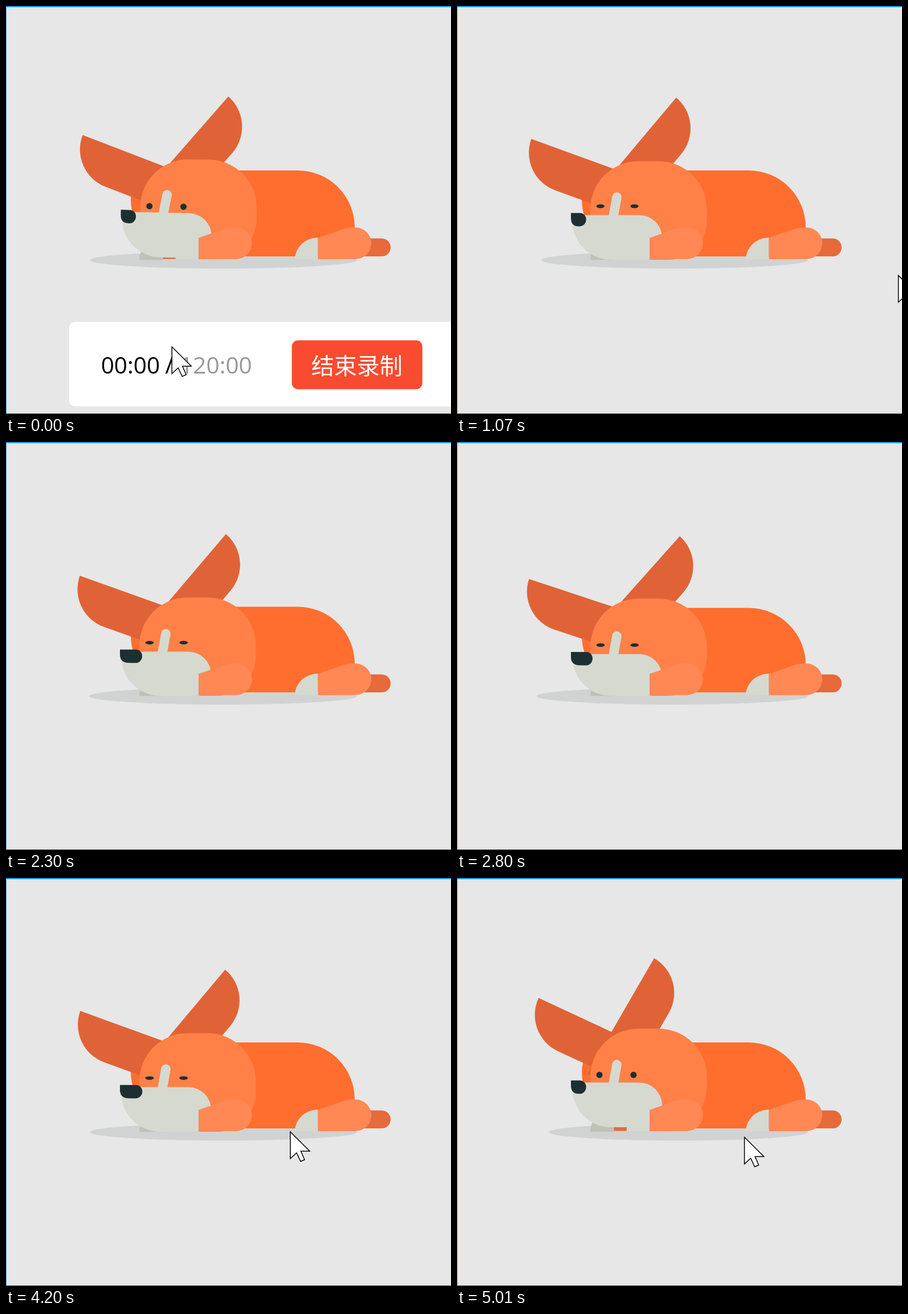
Animation of 781x717 px, one loop 5040 ms. Source, as an HTML page:

```html
<!DOCTYPE html>
<html lang="zh">
<head>
<meta charset="utf-8">
<title>Sleepy dog</title>
<style>
  html, body { margin: 0; width: 100%; height: 100%; overflow: hidden; background: #e7e7e7; }
  svg { display: block; width: 781px; height: 717px; }
  .body { fill: #ff6e2e; }
  .head { fill: #ff8147; }
  .leg { fill: #ff8855; }
  .ear { fill: #e06337; }
  .far { fill: #e66a3a; }
  .fur { fill: #d6d9d0; }
  .dark { fill: #1d3031; }
  .blaze { stroke: #d6d9d0; stroke-width: 16.5; stroke-linecap: round; }
  .time { font: 40.5px "Open Sans", "Noto Sans", sans-serif; }
  .label { font: 40px "Noto Sans CJK SC", "Noto Sans CJK", sans-serif; fill: #fff; }
</style>
</head>
<body>
<svg viewBox="0 0 781 717">
  <defs>
    <!-- tip at the origin, straight edge along +x -->
    <path id="earShape" d="M0 0H235V70.5H70.5A70.5 70.5 0 0 1 0 0Z"/>
    <g id="limb">
      <path class="fur" d="M507 445A40.5 38 0 0 1 547.5 407V445Z"/>
      <path class="leg" d="M547.5 445V407.5L592 392Q600 389.3 608 389.3H613.5A27.7 27.7 0 0 1 613.5 444.7Z"/>
    </g>
  </defs>
  <rect width="781" height="717" fill="#e7e7e7"/>
  <ellipse id="shadow" cy="446.5" ry="15" fill="#d1d3d2"/>
  <rect class="far" x="600" y="408.5" width="75" height="31.5" rx="15.7"/>
  <path id="body" class="body"/>
  <path d="M234 446.3A41.5 40 0 0 1 275.5 406V446.3Z" fill="#bec1b6"/>
  <rect class="far" x="275.5" y="410" width="70" height="34.5"/>
  <g id="headGroup">
    <use id="earR" class="ear" href="#earShape"/>
    <use id="earL" class="ear" href="#earShape"/>
    <path id="head" class="head"/>
    <path id="snout" class="fur"/>
    <g id="face">
      <path class="blaze" d="M280.5 -31.7L274 5"/>
      <path id="nose" class="dark"/>
      <g id="eyes">
        <ellipse class="dark"/>
        <ellipse class="dark"/>
      </g>
    </g>
  </g>
  <use href="#limb"/>
  <use href="#limb" x="-209.5"/>
  <g id="panel">
    <rect x="110.5" y="555" width="720" height="148.5" rx="10" fill="#fff"/>
    <text id="clock" class="time" x="166.5" y="646.5">00:00</text>
    <text class="time" x="279" y="646.5">/</text>
    <text class="time" x="305" y="646.5" fill="#999">120:00</text>
    <rect x="501.5" y="587.5" width="229" height="86" rx="11" fill="#f84b2f"/>
    <text class="label" x="535.5" y="647">结束录制</text>
  </g>
  <path id="cursor" d="M0 0V47L11 37L18 52L25 49L18.5 34H34Z" fill="#fff" stroke="#000" stroke-width="1.5"/>
  <rect width="1" height="717" fill="#45a6e0"/>
  <rect width="781" height="2" fill="#0d99ff"/>
  <rect y="716" width="781" height="1" fill="#3a3f44"/>
</svg>
<script>
const LOOP = 5040;
const SLEEP_START = 1580;
const $ = id => document.getElementById(id);
const progress = (x, a, b) => Math.min(1, Math.max(0, (x - a) / (b - a)));

function bezier(x1, y1, x2, y2) {
  const at = (a, b, s) => 3 * (1 - s) * (1 - s) * s * a + 3 * (1 - s) * s * s * b + s * s * s;
  return x => {
    let lo = 0, hi = 1;
    for (let i = 0; i < 24; i++) {
      const mid = (lo + hi) / 2;
      if (at(x1, x2, mid) < x) lo = mid; else hi = mid;
    }
    return at(y1, y2, lo);
  };
}
const ease = bezier(.3, .41, .18, 1.01);
const ramp = (x, a, b) => ease(progress(x, a, b));
// rises from a to b, falls from c to d
const pulse = (x, a, b, c, d) => ramp(x, a, b) - ramp(x, c, d);

function move(el, x, y, extra = "") {
  el.setAttribute("transform", `translate(${x} ${y}) ${extra}`);
}

// Each ear turns about the far corner of its base.
function placeEar(el, x, y, turn, mirror, length) {
  move(el, x, y, `scale(${mirror} 1) rotate(${turn}) translate(${-length} -70.5)`);
}

// q counts tenths of a second from the moment the dog falls asleep.
function drawDog(q) {
  const breath = pulse(q, 0, 5, 5, 10) + pulse(q, 10, 15, 15, 20) + pulse(q, 20, 22, 24, 26);
  const squash = breath + pulse(q, 28, 30, 30, 32);
  const flick = pulse(q, 28, 30, 31, 32);
  const alert = ramp(q, 31, 32);
  const settling = 1 - ramp(q, -20, -10);
  const closed = pulse(q, -10, 0, 30, 32);

  const left = 147.5 - 9.5 * breath + 13.8 * ramp(q, 30, 34);
  $("shadow").setAttribute("cx", (left + 616) / 2);
  $("shadow").setAttribute("rx", (616 - left) / 2);

  const back = 289 + 3.1 * squash;
  $("body").setAttribute("d", `M270 ${back}H512A100 100 0 0 1 612 ${back + 100}V400A40 40 0 0 1 572 440H319` +
    `A100 100 0 0 1 219 340A51 ${340 - back} 0 0 1 270 ${back}Z`);

  const lift = 5.5 * settling + 15.7 * ramp(q, 28, 55);
  move($("headGroup"), 0, -lift, `rotate(${6 * settling} 438 446)`);
  const crown = 272.7 + 3.2 * squash;
  $("head").setAttribute("d", `M318.5 ${crown}H354A84.5 84.5 0 0 1 438.5 ${crown + 84.5}V377` +
    `A69 69 0 0 1 369.5 446H303A69 69 0 0 1 234 377V${crown + 84.5}A84.5 84.5 0 0 1 318.5 ${crown}Z`);

  const sink = 2.2 * squash;
  const turn = 2 * breath;
  placeEar($("earR"), 296, 376.3 + sink, 50 - turn - 20 * flick + 10 * alert, -1, 222);
  placeEar($("earL"), 308.3, 373.4 + sink, 20 - turn - 10 * flick + 5 * alert, 1, 215);

  const top = 367.4 + 6.4 * breath;
  $("snout").setAttribute("d", `M202.5 ${top}H320A40 40 0 0 1 360 ${top + 40}V420A26 26 0 0 1 334 446H270.5` +
    `A68 68 0 0 1 202.5 378Z`);
  move($("face"), 0, top);

  const wide = 12.6 * pulse(q, -2, 0, 28, 34) - 1.6 * breath;
  $("nose").setAttribute("d", `M200 -3.7H${215.6 + wide}a11 11 0 0 1 11 11v1a11.5 11.5 0 0 1 -11.5 11.5` +
    `H${214 + wide / 4}Q200 19.8 200 5.5Z`);

  const rx = 5.5 + 1.9 * closed, ry = 5.5 - 2.35 * closed;
  move($("eyes"), 0, 13 * settling);
  [...$("eyes").children].forEach((eye, i) => {
    eye.setAttribute("cx", 244.5 + 59.8 * i + rx);
    eye.setAttribute("cy", ry - 19);
    eye.setAttribute("rx", rx);
    eye.setAttribute("ry", ry);
  });
}

// The recorder panel is dragged off to the right, with the pointer on it.
function drawRecorder(t) {
  const drag = (t / 370) ** 1.3;
  move($("panel"), 444 * drag, -111.5 * drag);
  $("clock").textContent = t < 200 ? "00:00" : "00:01";

  if (t < 2000) {
    const pull = Math.min(drag, 1.13), exit = progress(t, 1100, 1200);
    move($("cursor"), 291 + 428 * pull + 12 * exit, 599 - 111 * pull - 20 * exit);
  } else {
    const enter = progress(t, 3130, 3400), glide = ramp(t, 3400, 4200), settle = ramp(t, 4200, 4900);
    move($("cursor"), 785 - 238 * enter - 48 * glide + 5.5 * settle, 418 - 10 * enter + 38 * glide + 9.5 * settle);
  }
}

function draw(t) {
  drawDog((t - SLEEP_START) / 100);
  drawRecorder(t);
}

const start = performance.now();
function tick() {
  draw((performance.now() - start) % LOOP);
  requestAnimationFrame(tick);
}
draw(0);
requestAnimationFrame(tick);
</script>
</body>
</html>
```
